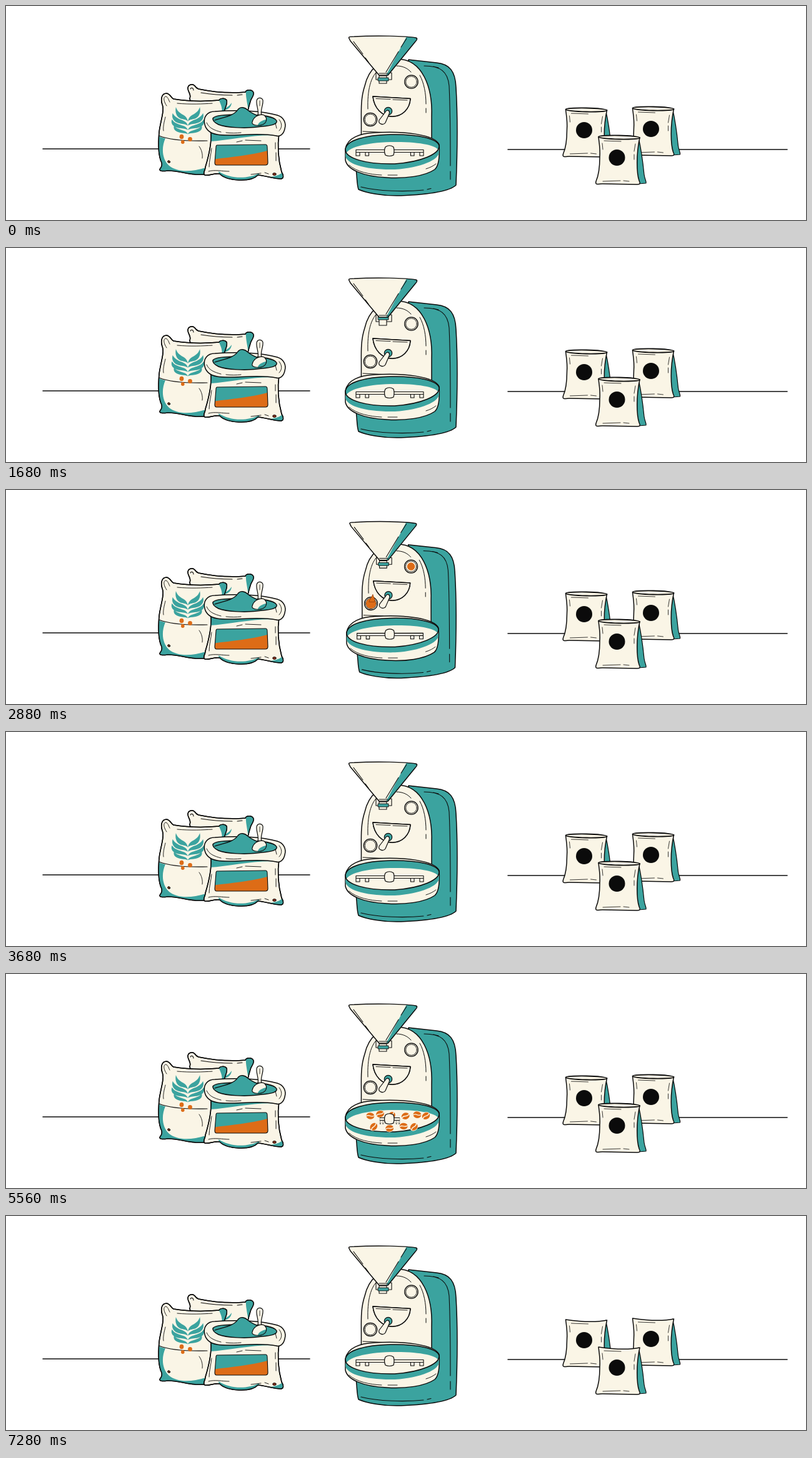
An HTML page with a canvas for the animation above (8 s loop, 1280x343 px).

```html
<!DOCTYPE html>
<html lang="en">
<head>
<meta charset="utf-8">
<title>Coffee roasting</title>
<style>
html, body { margin: 0; width: 100%; height: 100%; overflow: hidden; background: #fff; }
canvas { display: block; width: 100%; height: 100%; }
</style>
</head>
<body>
<canvas id="stage" width="1280" height="343"></canvas>
<script>
const ctx = document.getElementById('stage').getContext('2d');
const CREAM = '#faf5e6', TEAL = '#3ba39f', ORANGE = '#dd6c17', INK = '#0b0b0b';
const LOOP = 8000, TAU = Math.PI * 2;

const clamp = v => Math.max(0, Math.min(1, v));
const ramp = (t, a, b) => { const u = clamp((t - a) / (b - a)); return u * u * (3 - 2 * u); };
const pulse = (t, a, b, c, d) => ramp(t, a, b) * (1 - ramp(t, c, d));
const mix = (a, b, p) => a + (b - a) * p;
const inOut = u => u < .5 ? 4 * u ** 3 : 1 - (2 - 2 * u) ** 3 / 2;

const cache = {};
function shape(d, fill, width = 1.5, color = INK) {
  const path = cache[d] || (cache[d] = new Path2D(d));
  if (fill) { ctx.fillStyle = fill; ctx.fill(path); }
  if (width) { ctx.lineWidth = width; ctx.strokeStyle = color; ctx.stroke(path); }
}
const line = (d, width = 1.1) => shape(d, null, width);

function oval(x, y, rx, ry, fill, width = 0, turn = 0) {
  ctx.beginPath();
  ctx.ellipse(x, y, rx, ry, turn, 0, TAU);
  if (fill) { ctx.fillStyle = fill; ctx.fill(); }
  if (width) { ctx.lineWidth = width; ctx.strokeStyle = INK; ctx.stroke(); }
}

function within(d, paint) {
  ctx.save();
  ctx.clip(new Path2D(d));
  paint();
  ctx.restore();
}

function at(x, y, paint, sx = 1, sy = 1, turn = 0) {
  ctx.save();
  ctx.translate(x, y);
  ctx.rotate(turn);
  ctx.scale(sx, sy);
  paint();
  ctx.restore();
}

function bean(x, y, turn = -.35, size = 1) {
  if (size <= 0) return;
  at(x, y, () => {
    oval(0, 0, 7.3, 6.2, CREAM);
    oval(0, 0, 6.5, 5.3, ORANGE);
    shape('M-6 1C-2 -3 1 3 6 -1', null, 1.4, CREAM);
  }, size, size, turn);
}

function leaves(x, y) {
  for (const side of [-1, 1]) for (let i = 0; i < 4; i++) {
    at(x, y + i * 7, () => shape('M0 1C2 -9 11 -9 16 -13C20 -15 22 -18 24 -22C27 -10 19 -4 12 -3C7 -2 3 -2 0 1Z', TEAL, 0),
      side * (.8 + .27 * Math.sin(i * .9)), 1 - i * .13);
  }
}

function sacks() {
  const back = 'M294 148C297 142 291 138 291 132C291 126 298 124 302 128C304 131 305 132 308 133C332 138 360 140 383 138C384 134 394 133 396 139C397 144 392 148 391 153C388 162 386 168 386 178L300 178Z';
  shape(back, CREAM);
  within(back, () => {
    shape('M384 130H400V180H386C391 165 382 151 384 130Z', TEAL, 0);
    shape('M338 168C347 166 356 163 361 155C360 166 350 168 338 168ZM341 164C346 162 349 158 350 153C355 158 349 163 341 164Z', TEAL, 0);
  });
  shape(back, null);
  line('M300 135C300 131 296 130 295 133M312 139C330 142 345 143 362 143M370 143L378 142');

  const left = 'M250 158C247 149 249 140 257 140C263 141 264 147 268 149C292 153 320 153 341 151C342 148 350 147 353 151C355 157 350 163 349 170L340 268C332 270 320 270 312 270C292 271 276 263 258 264C252 265 246 265 246 262C246 260 251 258 249 251C245 243 243 225 245 202C247 185 254 167 250 158Z';
  shape(left, CREAM);
  within(left, () => {
    shape('M340 148H360V172H344C348 164 343 158 340 148Z', TEAL, 0);
    shape('M242 207C247 210 250 211 255 212C248 228 250 246 261 256C274 266 294 267 320 259V275H240Z', TEAL, 0);
  });
  line('M245 208C260 214 285 217 322 216', 1.2);
  shape(left, null);
  line('M257 160C251 151 252 145 256 145C259 146 260 150 262 154M274 156C295 158 315 157 330 156M252 200C251 194 253 186 255 178M309 225C313 230 315 238 314 244', .9);
  leaves(291, 184);
  oval(281, 209.5, 3.4, 3.8, ORANGE);
  oval(294.5, 213.5, 3.4, 3.4, ORANGE);
  oval(282.8, 218, 2.8, 3, ORANGE);
  oval(260.7, 249.6, 2.2, 1.7, '#6d2d0c', 1, .4);

  const body = 'M328 203C329 221 323 245 319 258C319 264 314 268 318 271C325 273 331 267 342 269C354 281 392 283 403 271C416 272 428 277 440 277C445 276 444 271 441 266C436 248 434 225 437 203Z';
  shape(body, CREAM);
  within(body, () => {
    shape('M326 200H440V208C402 204 360 215 326 217Z', TEAL, 0);
    shape('M340 265C358 277 386 278 405 268L404 290H344Z', TEAL, 0);
    shape('M446 262C440 271 432 273 420 274L426 280H448Z', TEAL, 0);
  });
  shape(body, null);
  line('M329 228C328 238 325 248 325 258M324 265C334 262 346 265 357 265M392 270L408 268M414 267L420 269M431 219V229M432 235V248M369 218L378 216M383 215L408 216', .9);
  const label = 'M338 223L415 222Q418 222 418 226L419 251Q419 255 415 255L337 255Q334 255 334 251L336 226Q336 223 338 223Z';
  shape(label, TEAL, 0);
  within(label, () => shape('M330 246C360 242 390 240 422 231V260H330Z', ORANGE, 0));
  shape(label, null, 1.1);
  oval(429.5, 269.5, 2.8, 1.9, '#8c2d18', 1);

  shape('M318 190C315 178 322 169 334 169C370 166 410 168 434 175C444 178 449 187 446 197C444 206 438 210 432 208C402 202 360 210 338 206C326 204 320 198 318 190Z', CREAM);
  shape('M331 180C334 175 350 174 380 174C412 174 430 178 433 184C435 190 422 192 410 193C385 197 352 195 340 190C334 187 330 184 331 180Z', TEAL);
  shape('M334 183C349 178 365 176 371 166C375 161 382 162 387 167C396 174 410 177 421 181C424 190 352 193 334 183Z', TEAL, 0);
  line('M334 183C349 178 365 176 371 166C375 161 382 162 387 167C393 172 398 174 403 176', 1.3);
  line('M321 187C325 196 333 199 344 202M352 203C360 204 369 204 376 203M437 182C442 188 442 195 437 200M431 188L433 196', .9);

  shape('M403 174C405 169 400 158 401 152C402 146 409 146 411 151C412 159 406 168 409 175Z', CREAM, 1.2);
  const scoop = 'M394 186C396 177 407 172 413 175C419 180 417 187 411 190C404 193 392 191 394 186Z';
  shape(scoop, CREAM, 0);
  within(scoop, () => shape('M402 193C404 185 411 183 419 181V194Z', TEAL, 0));
  shape(scoop, null, 1.2);
  line('M406 152V160', .8);
}

const tray = [[580, 227], [598, 226], [620, 227], [639, 226], [655, 226],
  [673, 229], [591, 244], [612, 246], [634, 245], [655, 246]];

function trayBeans(t) {
  if (t < 3800 || t >= 6240) return;
  const stir = pulse(t, 4640, 4840, 6000, 6200);
  tray.forEach(([x, y], i) => {
    const u = clamp((t - 3800 - i * 55) / 240);
    if (!u) return;
    const a = (t - 4600) / 800 * TAU + i * 1.7;
    bean(mix(612, x, u) + 3 * stir * Math.sin(a), mix(176, y, u * u) + 1.6 * stir * Math.cos(a),
      -.35 + (1 - u) * 3 + .5 * stir * Math.sin(a), Math.min(1, u * 3));
  });
}

function arm(t) {
  const swing = Math.cos(ramp(t, 4600, 6200) * TAU * 2);
  at(614, 0, () => {
    shape('M-54 230.5H54V234.5H-54ZM-54 234.5H-48V240H-54ZM-39 234.5H-33.5V240H-39ZM33.5 234.5H39V240H33.5ZM48 234.5H54V240H48Z', CREAM, 1.1);
  }, swing);
  shape('M607 226Q613.5 221.5 620 226Q622 232 620 239Q613.5 242 607 239Q604 232 607 226Z', CREAM, 1.2);
}

function gauge(x, y, on, r) {
  oval(x, y, 10.7, 10.7, CREAM, 1.3);
  oval(x, y, 8.8, 8.8, null, .9);
  if (on > 0) oval(x, y, r * on, r * on, ORANGE);
}

function door(t) {
  const open = pulse(t, 3720, 3880, 4620, 4860);
  const half = 'M587 145L647 148.5C646 165 634 177 618 177C601 177 589 163 587 145Z';
  shape(half, TEAL);
  at(0, 145, () => {
    ctx.translate(0, -145);
    shape(half, CREAM);
    line('M592 148.5L615 149.5M619 150L642 151', .9);
    oval(611.5, 168.5, 6.2, 6.2, TEAL, 1.2);
    shape('M607 170C609 165 615 167 613 173L607 187C604 192 595 189 597 183Z', CREAM, 1.2);
  }, 1, 1 - .21 * open);
}

function basin() {
  shape('M543 229C546 211 567 204 590 203C636 200 686 206 693 222C694 240 693 256 686 262C670 273 638 277 609 275C570 273 546 262 543 247Z', CREAM);
  const rim = 'M543 230C544 215 575 207 615 206C660 205 691 213 693 224C694 237 665 250 622 253C575 254 543 244 543 230Z';
  within('M540 229H700V280H540Z', () => at(0, 9, () => shape(rim, TEAL, 0)));
  shape(rim, TEAL, 0);
  within(rim, () => shape('M543 239C545 227 575 219 615 218C660 217 691 223 693 233L700 262H540Z', CREAM, 0));
  shape(rim, null);
  line('M549 255C561 266 582 270 601 271M611 271L626 271M672 261C679 259 684 256 688 253', .9);
}

function machine(t) {
  const heat = pulse(t, 1800, 2000, 3440, 3640);
  const wobble = pulse(t, 2080, 2200, 3520, 3640);
  ctx.save();
  ctx.translate(633, 177);
  ctx.rotate(-.155 * wobble * Math.sin((t - 2080) / 400 * TAU));
  ctx.scale(1 - .02 * wobble, 1 - .02 * wobble);
  ctx.translate(-633, -177);

  shape('M644 86L689 91C710 93 719 105 720 130C723 180 722 240 720 287C711 296 680 302 632 304C602 305 575 299 564 294C561 285 562 275 560 262L640 180Z', TEAL);
  line('M669 96C695 96 707 105 709 128C711 170 711 210 711 256M711 265V278M568 290C595 297 638 298 668 295M674 294L680 292.5M684 97L692 99');
  shape('M568 218C570 180 565 155 574 128C580 102 597 86 626 85C666 85 683 130 681 178L681 218Z', CREAM);
  line('M579 165C578 136 583 112 597 102M625 96C635 96 643 100 648 106M571 201L603 202.5M662 111C669 123 672 141 672 157M672 164V171', 1);

  const up = 5 * pulse(t, 1200, 1400, 1760, 1960);
  shape('M592 107H617V118H592Z', CREAM, 1.1);
  shape('M597 112H609V124H597Z', CREAM, 1.1);
  at(0, -up, () => shape('M595.5 115H612V120H595.5Z', TEAL, .9));

  const cone = 'M549 52C547 49 552 49 557 49C592 47 640 48 656 51C659 52 657 55 655 57L611 111H597L551 56Z';
  shape(cone, CREAM, 0);
  within(cone, () => shape('M643 45H665L612 115H606Z', TEAL, 0));
  shape(cone, null);
  line('M641 52L632 66M628 73L608 106M556 57L571 77M575 83L580 90M597 108H611', 1.1);

  gauge(648.5, 121.5, heat, 6.4);
  gauge(583, 182, heat, 8.2);
  if (heat > .02) at(585, 179, () => {
    shape('M-5 0C-5 -4 -1 -6 1 -12C2 -7 5 -5 4 0Z', ORANGE, .8, '#8f3c09');
  }, heat, heat);
  door(t);
  basin();
  trayBeans(t);
  arm(t);
  ctx.restore();
}

function sackBeans(t) {
  if (t < 80 || t > 1040) return;
  for (let i = 0; i < 10; i++) {
    const u = (t - 60 - i * 40) / 580;
    if (u <= 0 || u >= 1) continue;
    const p = mix(u, inOut(u), .4);
    const x = mix(395, 572 + (i * 7) % 27, p);
    const y = mix(168, 58, p) - (85 + (i % 3) * 4) * Math.sin(Math.PI * p);
    bean(x, Math.max(26, y), u * 5 + i, Math.min(1, u * 6));
  }
}

const bags = [[-52.5, -44], [54.5, -46], [0, 0]];

function flyingBeans(t) {
  if (t < 6240) return;
  const u = (t - 6240) / 810;
  if (u >= 1) return;
  const p = inOut(u), rise = 122 * Math.sin(Math.PI * p) ** 2.5;
  tray.forEach(([x, y], i) => {
    // the leftmost beans travel to the farthest bag
    const [dx, dy] = bags[x < 600 ? 1 : x < 640 ? 2 : 0];
    bean(mix(x, 980 + dx, p), mix(y, 222 + dy, p) - rise, -.35 + p * (1 + i * .2));
  });
}

function bag(x, y, closed, stretch) {
  at(x, y + 286, () => {
    ctx.translate(0, -286);
    shape('M1012 211C1016 228 1019 250 1021 270C1022 278 1025 281 1024 284L1012 285L1003 260Z', TEAL, 1.2);
    shape('M948 210C949 220 951 228 950 242C950 260 948 272 944 281C942 288 949 285 954 285L1010 286C1015 286 1015 284 1013 280C1009 268 1008 238 1014 211C995 215 968 213 948 210Z', CREAM);
    const lip = 3 * (1 - closed);
    if (lip > .1) oval(981, 210.5, 33, lip, CREAM, 1.8, .02);
    line('M955 281L983 280M988 280L997 281M1007 221L1005 233M1005 238V246M954 220L955 230M957 216L984 217', .8);
    oval(977.5, 243, 13, 13, INK);
  }, 1, stretch);
}

function draw(t) {
  ctx.setTransform(1, 0, 0, 1, 0, 0);
  ctx.fillStyle = '#fff';
  ctx.fillRect(0, 0, 1280, 343);
  ctx.lineJoin = ctx.lineCap = 'round';
  line('M59 229H486M803 230H1250', 1.5);
  sacks();
  sackBeans(t);
  machine(t);
  flyingBeans(t);
  const closed = ramp(t, 7000, 7200);
  const stretch = 1 + .12 * pulse(t, 6960, 7100, 7120, 7280);
  for (const [x, y] of bags) bag(x, y, closed, stretch);
}

function tick() {
  draw(performance.now() % LOOP);
  requestAnimationFrame(tick);
}
tick();
</script>
</body>
</html>
```
